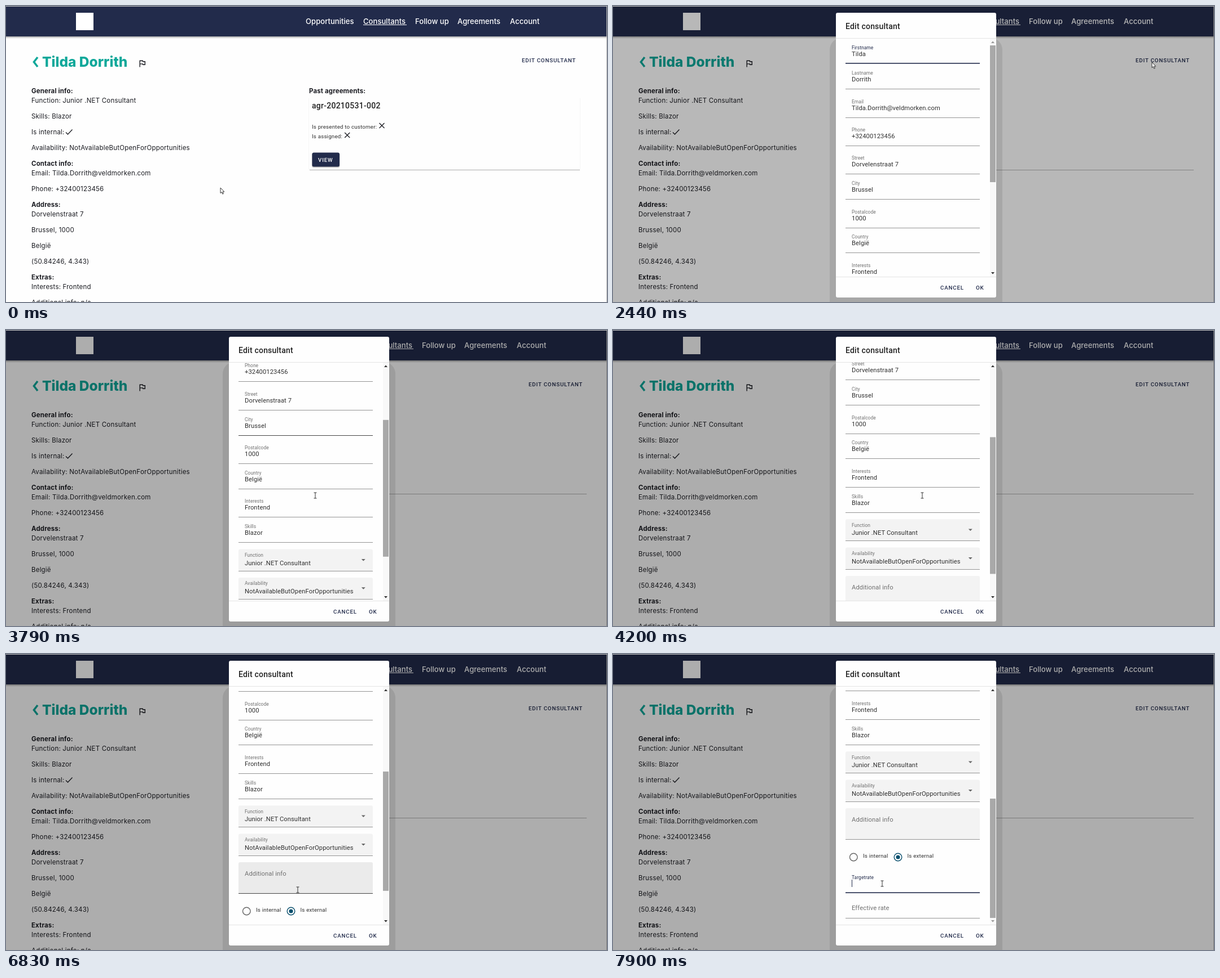
These frames come from a looping animation (1065 by 526 pixels, 8000 ms). An HTML page:

```html
<!DOCTYPE html>
<html lang="en">
<head>
<meta charset="utf-8">
<title>Edit consultant</title>
<style>
  html, body { margin: 0; width: 100%; height: 100%; overflow: hidden; background: #fefefe; }
  svg { display: block; width: 1065px; height: 526px; }
  .body, .bold, .nav, .name { font-family: Inter, "Open Sans", sans-serif; fill: #1b1c22; }
  .body { font-size: 11.5px; letter-spacing: .2px; }
  .bold { font-size: 11.5px; letter-spacing: .12px; font-weight: 700; }
  .nav { font-size: 13.1px; font-weight: 500; fill: #fff; }
  .name { font-size: 24.5px; font-weight: 800; fill: #0fa89a; }
  .value, .label, .small, .head, .btn { font-family: Roboto, Arial, sans-serif; fill: #303030; }
  .value { font-size: 11.2px; letter-spacing: .09px; }
  .label { font-size: 8.4px; letter-spacing: .08px; fill: #707070; }
  .hint { fill: #707070; }
  .small { font-size: 9.8px; letter-spacing: .17px; }
  .head { font-size: 14px; font-weight: 500; letter-spacing: .2px; fill: #222; }
  .btn { font-size: 9.8px; font-weight: 500; letter-spacing: .8px; fill: #222b4b; }
  .focus { fill: #222b4b; }
  .icon { fill: none; stroke: #1b1c22; stroke-width: 1.3; }
  .line { shape-rendering: crispEdges; }
  .pointer { fill: #fff; stroke: #222; stroke-width: .9; stroke-linejoin: round; }
</style>
</head>
<body>
<svg id="stage" viewBox="0 0 1065 526"></svg>
<script>
const LOOP = 8000, OPEN = 2210, SWITCH = 5970, FOCUS = 7750;
const NAVY = '#222b4b', LINE = '#949494';
const SIZE = { body: 11.5, bold: 11.5, nav: 13.1, name: 24.5, value: 11.2, label: 8.4, small: 9.8, head: 14, btn: 9.8 };

// Text placed by its left edge and the middle of its capitals
const text = (x, y, kind, str, attrs = '') =>
  `<text x="${x}" y="${(y + SIZE[kind.split(' ')[0]] * .36).toFixed(2)}" class="${kind}" ${attrs}>${str}</text>`;
const rect = (x, y, w, h, fill, attrs = '') =>
  `<rect x="${x}" y="${y}" width="${w}" height="${h}" fill="${fill}" ${attrs}/>`;
const line = (y, attrs = '') => rect(412, y, 238, 1, LINE, `class="line" ${attrs}`);
const cross = (x, y) => `<path class="icon" d="M${x - 4.5} ${y - 4.5}l9 9m0-9l-9 9"/>`;

const person = { first: 'Tilda', last: 'Dorrith', email: 'Tilda.Dorrith@veldmorken.com', phone: '+32400123456', street: 'Dorvelenstraat 7' };
const status = 'NotAvailableButOpenForOpportunities';
const job = 'Junior .NET Consultant';

const details = [
  [151, 'General info:', 1], [168, 'Function: ' + job], [196, 'Skills: Blazor'], [224, 'Is internal:'],
  [252, 'Availability: ' + status], [280, 'Contact info:', 1], [297, 'Email: ' + person.email],
  [325, 'Phone: ' + person.phone], [353, 'Address:', 1], [370, person.street], [398, 'Brussel, 1000'],
  [426, 'België'], [454, '(50.84246, 4.343)'], [482, 'Extras:', 1], [499, 'Interests: Frontend'], [527, 'Additional info: n/a']
].map(([y, s, bold]) => text(45, y, bold ? 'bold' : 'body', s)).join('');

const nav = [[531, 'Opportunities'], [633, 'Consultants'], [725, 'Follow up'], [800, 'Agreements'], [893, 'Account']]
  .map(([x, s]) => text(x, 27.5, 'nav', s)).join('') + rect(633, 33, 77, 1, '#fff');

const page = `
  ${rect(0, 0, 1065, 526, '#fefefe')}
  ${rect(0, 54, 1064, 4, 'url(#fall)')}
  ${rect(0, 1, 1064, 53, NAVY)}
  ${rect(0, 0, 1065, 1, '#c4c4c4')}
  ${rect(124, 12, 31, 31, '#fff')}
  <path d="M56 91L49.5 99.5L56 108" fill="none" stroke="#0fa89a" stroke-width="3.6"/>
  ${text(64, 99.5, 'name', person.first + ' ' + person.last)}
  <path transform="translate(233 93.8) scale(.7)" fill="#1b1c22"
    d="M12.36 6l.4 2H18v6h-3.36l-.4-2H7V6h5.36M14 4H5v17h2v-7h5.6l.4 2h7V6h-5.6L14 4z"/>
  ${details}
  <path class="icon" d="M106 224.5l3.5 3.5L117.5 219.5"/>
  <g id="right">
    ${nav}
    ${rect(909, 83, 108, 25, '#f5f5f7', 'id="editHover" rx="3"')}
    ${text(914, 96.5, 'btn', 'EDIT CONSULTANT')}
    ${text(537, 151, 'bold', 'Past agreements:')}
    ${rect(538, 291, 479, 1, '#b5b5b5')}
    <g id="card">
      ${rect(536.5, 162, 481, 129, '#ececec', 'rx="3"')}
      ${rect(537, 159, 480, 131.5, '#fefefe', 'rx="3"')}
      <g id="cardTint">${rect(537, 254, 480, 36, '#f7f7f7')}${rect(526, 159, 11, 95, '#f5f5f5')}</g>
      ${text(542, 176.5, 'head', 'agr-20210531-002', 'style="letter-spacing:.28px"')}
      ${text(542, 214, 'small', 'Is presented to customer:')}${cross(666, 212.5)}
      ${text(542, 231, 'small', 'Is assigned:')}${cross(604.7, 229.5)}
      ${rect(542, 261.5, 49.5, 25.5, '#bbb', 'rx="3"')}
      ${rect(542.5, 260.5, 48.5, 25, NAVY, 'rx="3"')}
      ${text(553, 273, 'btn', 'VIEW', 'style="fill:#fff"')}
    </g>
  </g>
  ${rect(1064, 0, 1, 526, '#b4b4b4')}`;

// Rows are 50.4 high, or 44.8 when packed closer
let rowY = 96.7;
const fields = [
  [50.4, 'Lastname', person.last], [50.4, 'Email', person.email], [50.4, 'Phone', person.phone],
  [50.4, 'Street', person.street], [44.8, 'City', 'Brussel'], [50.4, 'Postalcode', '1000'],
  [44.8, 'Country', 'België'], [50.4, 'Interests', 'Frontend'], [44.8, 'Skills', 'Blazor']
].map(([step, label, value]) => {
  rowY += step;
  return line(rowY.toFixed(1), `id="line${label}"`) +
    text(423, rowY - 28, 'label', label) + text(423, rowY - 17, 'value', value);
}).join('');

const select = (y, label, value) =>
  rect(412, y, 238, 39, '#f3f3f3', 'rx="3"') + line(y + 38) +
  text(423, y + 10.3, 'label', label) + text(423, y + 24.2, 'value', value) +
  `<path d="M629.8 ${y + 17.3}h7l-3.5 3.5z" fill="#666"/>`;

const radio = (x, id) => `<g id="${id}"><circle cx="${x}" cy="734" r="6.8" fill="none" stroke-width="1.4"/>
  <circle cx="${x}" cy="734" r="3.6" fill="#0b506e" stroke="none"/></g>`;

const form = `
  ${text(423, 74, 'label focus', 'Firstname')}${text(423, 85, 'value', person.first)}
  ${rect(412, 101, 238, 1.6, NAVY)}
  ${fields}
  ${select(546.2, 'Function', job)}
  ${select(596.6, 'Availability', status)}
  ${rect(412, 647, 238, 56, '#f3f3f3', 'id="area" rx="3"')}
  ${line(702, 'id="areaLine"')}
  ${text(423, 666.5, 'value hint', 'Additional info')}
  <circle id="ripple" cx="505" cy="734" r="14" fill="#0b506e"/>
  ${radio(426.3, 'internal')}${text(443, 731.5, 'small', 'Is internal')}
  ${radio(505, 'external')}${text(521.5, 731.5, 'small', 'Is external')}
  <g id="rates">
    ${line(797)}
    ${rect(412, 796.4, 238, 1.6, NAVY, 'id="rateLine"')}
    <text id="rate" x="423" class="value">Targetrate</text>
    ${rect(423, 774, 1, 13, NAVY, 'id="caret"')}
    ${text(423, 823.5, 'value hint', 'Effective rate')}
    ${line(842)}
  </g>`;

const stage = document.getElementById('stage');
stage.innerHTML = `
  <defs>
    <linearGradient id="fall" x2="0" y2="1"><stop stop-color="#aaa"/><stop offset="1" stop-color="#fefefe"/></linearGradient>
    <clipPath id="view"><rect x="395" y="58" width="273" height="423"/></clipPath>
  </defs>
  ${page}
  ${rect(0, 1, 1065, 525, '#000', 'id="shade"')}
  <g id="dialog">
    ${rect(384, 56, 306, 490, 'rgba(0,0,0,.09)', 'rx="22"')}
    ${rect(395, 12, 284, 506, '#fefefe', 'rx="3"')}
    ${text(412, 35.5, 'head', 'Edit consultant')}
    ${rect(395, 57, 284, 1, '#e4e4e4')}
    <g clip-path="url(#view)"><g id="form">${form}</g></g>
    ${rect(668, 58, 10, 423, '#f8f8f8')}
    ${rect(668, 70, 10, 243, '#a9a9a9', 'id="thumb"')}
    <path id="up" d="M670 66h6l-3-3.4z"/>
    <path id="down" d="M670 473h6l-3 3.4z"/>
    ${rect(395, 481, 284, 1, '#e4e4e4')}
    ${text(580, 500, 'btn', 'CANCEL')}${text(643, 500, 'btn', 'OK')}
  </g>
  <g id="cursor">
    <path id="arrow" class="pointer" d="M0 0V9.6L2.2 7.6 3.8 11.2 5.4 10.5 3.9 7.1H6.8Z"/>
    <path id="hand" class="pointer" d="M-1 1.2Q0 0 1 1.2V5L4.5 5.8Q6 6.2 5.7 8L4.8 13H0L-3.4 8.8Q-3.6 7-2 7.3L-1 8.2Z"/>
    <path id="beam" fill="none" stroke="#333" d="M-2.5-5H2.5M0-5V5M-2.5 5H2.5"/>
  </g>`;

const el = {};
stage.querySelectorAll('[id]').forEach(n => el[n.id] = n);

// Rows: time, values, then 'lin' for an even pace up to that row
const scrollKeys = [[3460, [0]], [3790, [156.6], 'lin'], [4080, [210]], [4300, [210]], [4500, [272]],
  [6810, [272]], [6830, [277], 'lin'], [7200, [373]]];
const pathKeys = [[970, [380, 323]], [1770, [935, 107]], [1880, [935, 107]], [2070, [955, 100]],
  [2590, [955, 100]], [3060, [656, 244.5], 'lin'], [3360, [548, 294], 'lin'], [4450, [548, 294]],
  [4780, [580, 378]], [5150, [580, 378]], [5910, [507, 452]], [6100, [507, 452]], [6640, [517, 419]],
  [7350, [517, 419]], [7610, [477, 408]]];
const shadeKeys = [[OPEN, [0]], [2440, [.28], 'lin'], [2590, [.28]], [2700, [.32], 'lin']];
const shapes = [[0, 'arrow'], [1770, 'hand'], [2400, 'arrow'], [3240, 'beam'], [4560, 'arrow'],
  [5270, 'beam'], [5660, 'hand'], [6250, 'beam']];

const clamp = v => Math.max(0, Math.min(1, v));
const smooth = p => p * p * (3 - 2 * p);
const between = (t, a, b) => t >= a && t < b;

function track(keys, t) {
  const i = keys.findIndex(k => k[0] > t);
  if (i < 0) return keys[keys.length - 1][1];
  if (i === 0) return keys[0][1];
  const [t0, from] = keys[i - 1], [t1, to, pace] = keys[i];
  const p = (t - t0) / (t1 - t0), e = pace ? p : smooth(p);
  return from.map((v, n) => v + (to[n] - v) * e);
}
const set = (id, attrs) => { for (const k in attrs) el[id].setAttribute(k, attrs[k]); };
const show = (id, on) => set(id, { display: on ? 'inline' : 'none' });

function drawRadio(id, on) {
  set(id, { stroke: on ? '#0b506e' : '#666' });
  el[id].lastElementChild.setAttribute('opacity', on ? 1 : 0);
}

function drawDialog(t) {
  const p = clamp((t - OPEN) / 230), k = .8 + .2 * (1 - (1 - p) ** 3);
  set('dialog', { opacity: p, transform: `translate(537 265) scale(${k}) translate(-537 -265)` });

  const more = t >= SWITCH, max = more ? 373 : 272, height = more ? 212 : 243;
  const y = track(scrollKeys, t)[0];
  set('form', { transform: `translate(0 ${-y.toFixed(1)})` });
  set('thumb', { y: 70 + y / max * (399 - height), height });
  set('up', { fill: y > 0 ? '#333' : '#999' });
  set('down', { fill: y < max ? '#333' : '#999' });

  set('lineCity', { fill: between(t, 3560, 3900) ? '#444' : LINE });
  const hover = between(t, 5150, 5660) || between(t, 6300, 7020);
  const warm = hover ? clamp((t - (t < 6000 ? 5150 : 6300)) / 80) : 0;
  set('area', { fill: `rgb(${Array(3).fill(Math.round(243 - 8 * warm))})` });
  set('areaLine', { fill: hover ? '#444' : LINE });

  drawRadio('internal', !more);
  drawRadio('external', more);
  const r = clamp((t - SWITCH) / 450);
  set('ripple', { r: 6 + 8 * clamp(r * 3), opacity: more ? .14 * (1 - r) : 0 });

  show('rates', more);
  const f = smooth(clamp((t - FOCUS) / 150)), size = 11.2 - 2.8 * f;
  el.rate.style.fontSize = size + 'px';
  el.rate.style.fill = f > 0 ? NAVY : '#707070';
  set('rate', { y: 778 - 8 * f + size * .36 });
  set('rateLine', { x: 531 - 119 * f, width: 238 * f });
  set('caret', { opacity: t >= FOCUS ? 1 : 0 });
}

function render(t) {
  const open = t >= OPEN;
  set('right', { transform: `translate(${open ? 12 : 0} 0)` });
  show('card', !open);
  show('editHover', between(t, 1770, OPEN));
  show('cardTint', between(t, 1500, OPEN));
  set('shade', { opacity: track(shadeKeys, t)[0] });
  drawDialog(t);

  const [x, y] = track(pathKeys, t);
  set('cursor', { transform: `translate(${x.toFixed(1)} ${y.toFixed(1)})` });
  const shape = shapes.filter(s => s[0] <= t).pop()[1];
  ['arrow', 'hand', 'beam'].forEach(id => show(id, id === shape));
}

const start = performance.now();
function tick() {
  render((performance.now() - start) % LOOP);
  requestAnimationFrame(tick);
}
tick();
</script>
</body>
</html>
```
